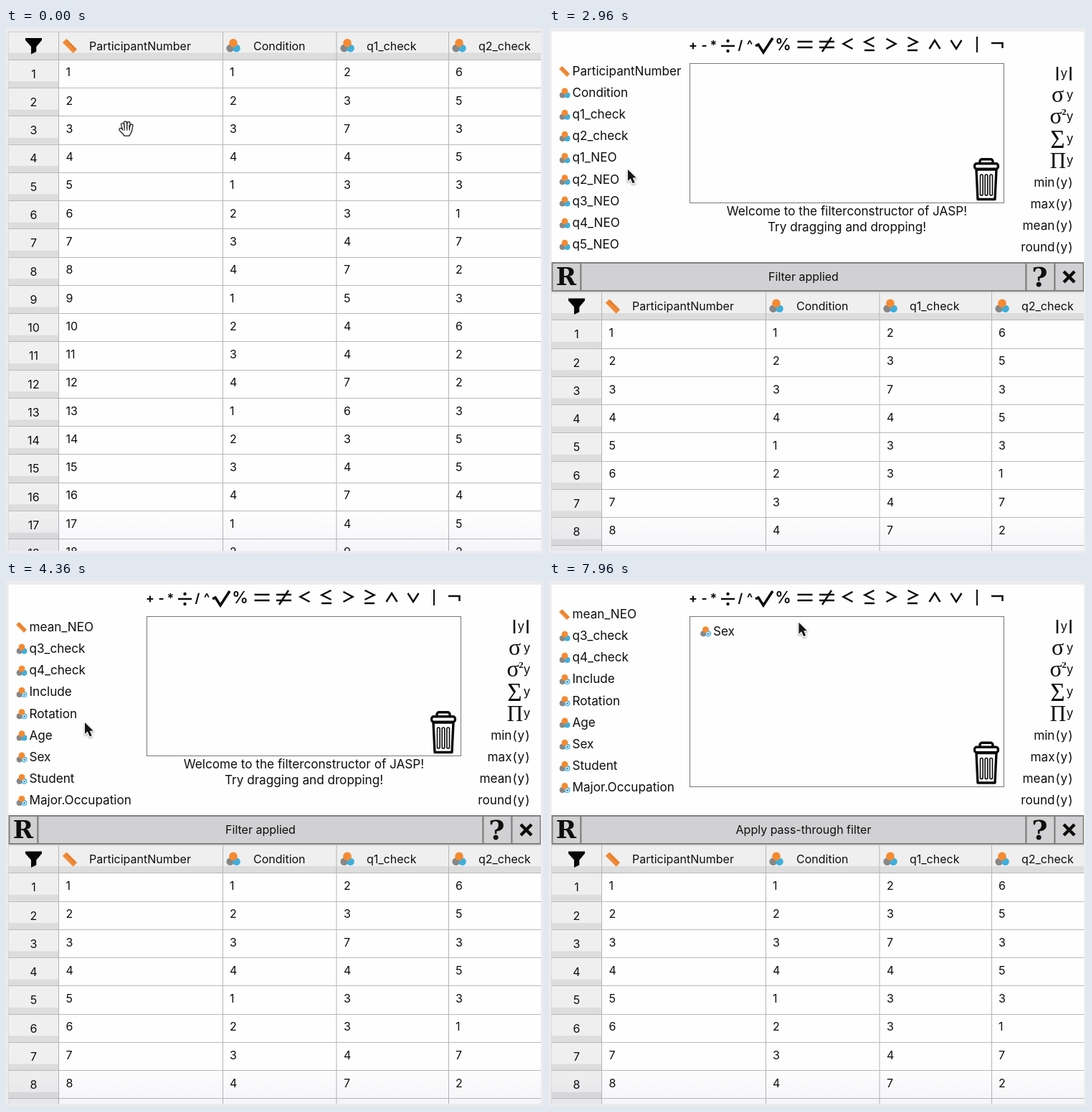
Recreate the animation shown at these times as an HTML page with a canvas. Size 749 px wide and 731 px high, loop 8000 ms.

```html
<!DOCTYPE html>
<html lang="en">
<head>
<meta charset="utf-8">
<title>Filter constructor</title>
<style>
html, body { margin: 0; width: 100%; height: 100%; overflow: hidden; background: #ececec; }
canvas { display: block; width: 749px; height: 731px; }
</style>
</head>
<body>
<canvas id="stage" width="749" height="731"></canvas>
<script>
const ctx = document.getElementById('stage').getContext('2d');
const LOOP = 8000, ROW = 39.27, PANEL = 362.6, ITEM = 30.2, LARGE = 17.15;
const SANS = 'Inter, sans-serif', SLAB = '"DejaVu Serif", "Noto Serif", serif', MATH = '"Liberation Serif", serif';
const INK = '#0e0e0e', RING = '#169fcd';

const Q1 = '237433475447634749', Q2 = '653531723622355452';
const COLUMNS = [[317, 345, 'Condition'], [476, 503, 'q1_check'], [632, 659, 'q2_check']];
const VARIABLES = ['ParticipantNumber', 'Condition', 'q1_check', 'q2_check',
  ...Array.from({ length: 12 }, (_, i) => `q${i + 1}_NEO`),
  'mean_NEO', 'q3_check', 'q4_check', 'Include', 'Rotation', 'Age', 'Sex', 'Student', 'Major.Occupation'];
const SCALES = ['ParticipantNumber', 'mean_NEO'];
const LABELS = ['Include', 'Rotation', 'Sex', 'Student', 'Major.Occupation'];

const clamp = v => Math.min(1, Math.max(0, v));
const progress = (t, a, b) => clamp((t - a) / (b - a));
const smooth = p => p * p * (3 - 2 * p);
const mix = (a, b, p) => a + (b - a) * p;
const bend = (a, c, b, p) => [0, 1].map(i => mix(mix(a[i], c[i], p), mix(c[i], b[i], p), p));

// Hermite interpolation through [time, value, slope] keys
function track(t, keys) {
  if (t <= keys[0][0]) return keys[0][1];
  for (let i = 1; i < keys.length; i++) {
    const [t0, v0, m0] = keys[i - 1], [t1, v1, m1] = keys[i];
    if (t > t1) continue;
    const d = t1 - t0, p = (t - t0) / d, q = 1 - p;
    return mix(v0, v1, smooth(p)) + d * p * q * (m0 * q - m1 * p);
  }
  return keys[keys.length - 1][1];
}

function text(str, x, cy, size = 16, align = 'left', family = SANS, weight = 400) {
  ctx.font = `${weight} ${size}px ${family}`;
  ctx.textAlign = align;
  ctx.fillStyle = INK;
  ctx.fillText(str, x, cy + size * 0.36);
}

function rect(x, y, w, h, fill) {
  ctx.fillStyle = fill;
  ctx.fillRect(x, y, w, h);
}

function trace(points, close) {
  ctx.beginPath();
  points.forEach(([x, y]) => ctx.lineTo(x, y));
  if (close) ctx.closePath();
}

function stroke(points, width = 2.5, color = '#0c0c0c') {
  trace(points);
  ctx.lineWidth = width;
  ctx.strokeStyle = color;
  ctx.stroke();
}

function dot(x, y, r, fill) {
  ctx.beginPath();
  ctx.arc(x, y, r, 0, 7);
  ctx.fillStyle = fill;
  ctx.fill();
}

function at(x, y, scale, draw) {
  ctx.save();
  ctx.translate(x, y);
  ctx.scale(scale, scale);
  draw();
  ctx.restore();
}

function rulerIcon(x, y, scale = 1) {
  at(x, y, scale, () => {
    ctx.rotate(Math.PI / 4);
    rect(-10.5, -3.8, 21, 7.6, '#f28a35');
    for (let i = -7; i <= 7; i += 3.5) rect(i - 0.5, -3.8, 1, 3, '#c9661c');
  });
}

function nominalIcon(x, y, scale = 0.97, labelled = false) {
  at(x, y, scale, () => {
    dot(-4.4, 3.8, 5.5, '#878787');
    dot(4.6, 3.8, 5.5, '#3eafdb');
    dot(0, -3.8, 6, '#f58a30');
    if (labelled) {
      dot(4.8, 4.2, 3.7, '#d9f0fa');
      dot(4.8, 4.2, 2, '#3f9dcc');
    }
  });
}

function variable(name, x, y) {
  if (SCALES.includes(name)) rulerIcon(x - 11, y + 1, 0.74);
  else nominalIcon(x - 10.5, y + 1, 0.74, LABELS.includes(name));
  text(name, x, y, LARGE);
}

function funnel(x, y) {
  trace([[-11.5, -11], [11.5, -11], [11.5, -8], [3.8, 1], [3.8, 8], [-3.5, 11.5], [-3.5, 1], [-11.5, -8]]
    .map(([a, b]) => [x + a, y + b]), true);
  ctx.fillStyle = '#050505';
  ctx.fill();
}

function haze() {
  const fade = ctx.createLinearGradient(0, 675, 0, 728);
  fade.addColorStop(0, '#ffffff');
  fade.addColorStop(1, '#f6f6fa');
  ctx.globalCompositeOperation = 'multiply';
  rect(4, 675, 742, 53, fade);
  ctx.globalCompositeOperation = 'source-over';
}

function table(offset) {
  ctx.save();
  ctx.beginPath();
  ctx.rect(3.5, 5, 742.5, 723);
  ctx.clip();
  ctx.translate(0, offset);
  rect(3, 5, 743, 730, '#fefefe');
  rect(3, 5, 743, 39, '#efefef');
  rect(3, 34.5, 743, 9.5, '#dddddd');
  funnel(38.5, 25);
  rulerIcon(89, 25);
  text('ParticipantNumber', 116, 25);
  for (const [icon, x, name] of COLUMNS) {
    nominalIcon(icon, 24.5);
    text(name, x, 25);
  }
  for (let i = 0; i < 18; i++) {
    const top = 44 + i * ROW, cy = 61.6 + i * ROW;
    rect(3, top, 70, ROW, '#efefef');
    rect(3, top + ROW - 9, 70, 9, '#dddddd');
    text(i + 1, 38.5, cy + 2.3, 16, 'center');
    text(i + 1, 83.5, cy);
    text(i % 4 + 1, 312, cy);
    text(Q1[i], 471, cy);
    text(Q2[i], 627, cy);
  }
  for (let i = 0; i < 19; i++) rect(3, Math.round(43.7 + i * ROW + offset) - offset, 743, 1, '#b9b9be');
  for (const x of [73, 302, 460.5, 617]) rect(x, 5, 1, 730, '#b5b5ba');
  rect(3, 5, 1, 730, '#c4c4c4');
  rect(3, 5, 743, 1, '#cccccc');
  ctx.restore();
  haze();
}

function operators() {
  const shift = (x, y, pts) => pts.map(([a, b]) => [x + a, y + b]);
  const small = [['+', 201], ['-', 216.5], ['*', 229.5], ['/', 267], ['^', 280]];
  for (const [s, x] of small) text(s, x, 24, 17.5, 'center', SANS, 700);
  text('%', 326.5, 22.5, 22.5, 'center', SANS, 600);
  stroke([[240, 25], [259, 25]]);
  dot(249.5, 18, 2.2, '#111');
  dot(249.5, 32, 2.2, '#111');
  stroke([[288, 25], [292, 23], [299, 34], [312, 14]], 3.6);
  for (const x of [357, 387.5]) {
    stroke([[x - 10.5, 19], [x + 10.5, 19]]);
    stroke([[x - 10.5, 27], [x + 10.5, 27]]);
  }
  stroke([[394, 13], [381, 33]]);
  const chevron = (x, y, w, h) => stroke(shift(x, y, [[w, -h], [-w, 0], [w, h]]));
  chevron(417, 22, 6.5, 7);
  chevron(447, 19.5, 6.5, 6.5);
  chevron(477, 22, -6.5, 7);
  chevron(507, 19.5, -6.5, 6.5);
  for (const x of [447, 507]) stroke([[x - 7, 31], [x + 7, 31]]);
  stroke([[530.5, 29], [538, 17], [545.5, 29]]);
  stroke([[560.5, 17], [568, 29], [575.5, 17]]);
  stroke([[597, 12], [597, 34]], 2);
  stroke([[617, 21], [632.5, 21], [632.5, 28]]);
}

function functions() {
  for (const x of [709, 727.5]) stroke([[x, 54], [x, 73]]);
  text('y', 718.3, 62.5, LARGE, 'center');
  [['σ', 94, 32], ['σ', 124, 32], ['Σ', 154.5, 35], ['Π', 184.5, 31]].forEach(([s, y, size], i) => {
    text(s, [709.5, 707, 709.5, 710][i], y - (i < 2 ? 3 : 0.4), size, 'center', MATH);
    text('y', 731.3, y - 1, LARGE, 'right');
  });
  text('2', 718.5, 116.5, 13, 'center', MATH, 700);
  ['min', 'max', 'mean', 'round'].forEach((name, i) => {
    const y = 214.5 + i * 30.2;
    text(name, 705.5, y, LARGE, 'right');
    text('(', 706.5, y, LARGE);
    text('y', 718.3, y, LARGE, 'center');
    text(')', 730.5, y, LARGE, 'right');
  });
}

function trash(y) {
  ctx.save();
  ctx.translate(610, y);
  ctx.lineJoin = 'round';
  ctx.strokeStyle = '#0a0a0a';
  ctx.fillStyle = '#fefefe';
  ctx.lineWidth = 3.4;
  const box = (x, top, w, h, r) => {
    ctx.beginPath();
    ctx.roundRect(x, top, w, h, r);
    ctx.stroke();
  };
  box(-9, 1.8, 18, 7, 3);
  trace([[-14, 16], [14, 16], [12, 57.5], [-12, 57.5]], true);
  ctx.stroke();
  ctx.beginPath();
  ctx.roundRect(-16.4, 7.8, 32.8, 7.5, 3);
  ctx.fill();
  ctx.stroke();
  ctx.lineWidth = 1.6;
  for (const x of [-8.5, -1.8, 4.9]) box(x, 23, 3.6, 29, 1.8);
  ctx.restore();
}

function panel(t, bottom) {
  const dropped = t >= 6730, dragging = t >= 6040 && !dropped;
  const scroll = track(t, [[3430, 0, 0], [3900, 268, 0.62], [4360, 479, 0.1], [4860, 497, 0]]);
  ctx.save();
  ctx.beginPath();
  ctx.rect(3.5, 5, 742.5, Math.max(0, bottom - 5));
  ctx.clip();
  rect(3, 5, 743, 325, '#fefefe');
  operators();
  functions();
  ctx.lineWidth = 1;
  ctx.strokeStyle = '#777';
  ctx.strokeRect(196.5, 49.5, 438, dropped ? 237 : 194);
  trash(dropped ? 223.5 : 181);
  if (dropped) {
    variable('Sex', 229, 69.5);
  } else {
    text('Welcome to the filterconstructor of JASP!', 415.5, 255, LARGE, 'center');
    text('Try dragging and dropping!', 415.5, 276.7, LARGE, 'center');
  }
  VARIABLES.forEach((name, i) => {
    const y = 59.5 + i * ITEM - scroll;
    if (y < 36 || y > 307 || (dragging && name === 'Sex')) return;
    variable(name, 32.5, y);
  });
  if (dragging) {
    const p = smooth(progress(t, 6040, 6440));
    variable('Sex', mix(32.5, 203, p), mix(226.5, 184, p));
  }
  ctx.restore();
}

function bar(t, top) {
  ctx.save();
  ctx.beginPath();
  ctx.rect(3, 5, 743, 723);
  ctx.clip();
  ctx.translate(0, top - 326);
  for (const [x, w] of [[4, 40], [44, 621], [665, 40], [705, 40]]) {
    rect(x, 326, w, 41, '#d1d1d3');
    ctx.strokeStyle = '#808080';
    ctx.lineWidth = 2;
    ctx.strokeRect(x + 0.5, 327, w, 39);
  }
  text('R', 24, 346, 34, 'center', SLAB, 700);
  text('?', 684.5, 346, 38, 'center', SLAB, 700);
  stroke([[718, 339], [733, 354]], 4.5);
  stroke([[733, 339], [718, 354]], 4.5);
  text(t >= 6730 ? 'Apply pass-through filter' : 'Filter applied', 355, 346, 16, 'center');
  ctx.restore();
}

function ring(t, start, x, y) {
  const p = (t - start) / 750;
  if (p <= 0 || p >= 1) return;
  ctx.globalAlpha = Math.min(1, (1 - p) * 3);
  ctx.beginPath();
  ctx.arc(x, y, 32 * p, 0, 7);
  ctx.lineWidth = 2.8;
  ctx.strokeStyle = RING;
  ctx.stroke();
  ctx.globalAlpha = 1;
}

function arrow([x, y]) {
  at(x, y, 0.97, () => {
    trace([[0, 0], [0, 16.5], [3.8, 13], [7, 20], [10, 18.7], [7, 12], [12, 11.8]], true);
    ctx.shadowColor = 'rgba(0,0,0,.35)';
    ctx.shadowBlur = 3;
    ctx.shadowOffsetY = 1.5;
    ctx.lineWidth = 2.4;
    ctx.lineJoin = 'round';
    ctx.strokeStyle = '#fff';
    ctx.stroke();
    ctx.shadowColor = 'transparent';
    ctx.fillStyle = '#161616';
    ctx.fill();
  });
}

function hand([x, y]) {
  ctx.save();
  ctx.translate(x, y);
  ctx.lineCap = ctx.lineJoin = 'round';
  const fingers = [[-5.5, -5.5, -3, 2], [-1.5, -8, -0.5, 2], [3, -7.5, 2.5, 2], [7, -4, 5.5, 3], [-8.2, 1.5, -3.5, 6]];
  const shape = (color, grow) => {
    for (const [a, b, c, d] of fingers) stroke([[a, b], [c, d]], 2.6 + grow, color);
    trace([[-4, 2], [6, 2], [5, 6], [3.5, 9], [-2.5, 9], [-5, 5]], true);
    ctx.lineWidth = 1 + grow;
    ctx.strokeStyle = ctx.fillStyle = color;
    ctx.fill();
    ctx.stroke();
  };
  ctx.shadowColor = 'rgba(0,0,0,.3)';
  ctx.shadowBlur = 2;
  shape('#222', 2.4);
  ctx.shadowColor = 'transparent';
  shape('#fff', 0);
  for (const i of [-2.6, 0.9, 4.3]) stroke([[i - 0.6, -4], [i, 2.5]], 1.1, '#222');
  ctx.restore();
}

function pointer(t) {
  const leg = (a, b) => smooth(progress(t, a, b));
  if (t < 860) return hand(bend([168, 140], [105, 86], [43, 33], leg(10, 850)));
  if (t < 4980) return arrow(bend([41, 27], [30, 95], [110, 197], leg(1990, 2970)));
  if (t < 6040) return arrow(bend([110, 197], [76, 211], [43, 226], leg(4980, 5610)));
  if (t < 7640) return arrow(bend([43, 226], [200, 219], [318, 140], leg(6050, 6717)));
  arrow(bend([318, 140], [333, 99], [348.5, 57.5], leg(7640, 7970)));
}

function draw(t) {
  const offset = PANEL * smooth(progress(t, 1280, 1580));
  const barTop = 326 - PANEL + offset;
  rect(0, 0, 749, 731, '#ececec');
  table(offset);
  if (offset > 0) {
    panel(t, barTop);
    bar(t, barTop);
  }
  ring(t, 1270, 41.5, 28.5);
  ring(t, 6010, 43.5, 225.5);
  ring(t, 6415, 215.5, 184);
  pointer(t);
}

const begin = performance.now();
function tick() {
  draw((performance.now() - begin) % LOOP);
  requestAnimationFrame(tick);
}
tick();
</script>
</body>
</html>
```
